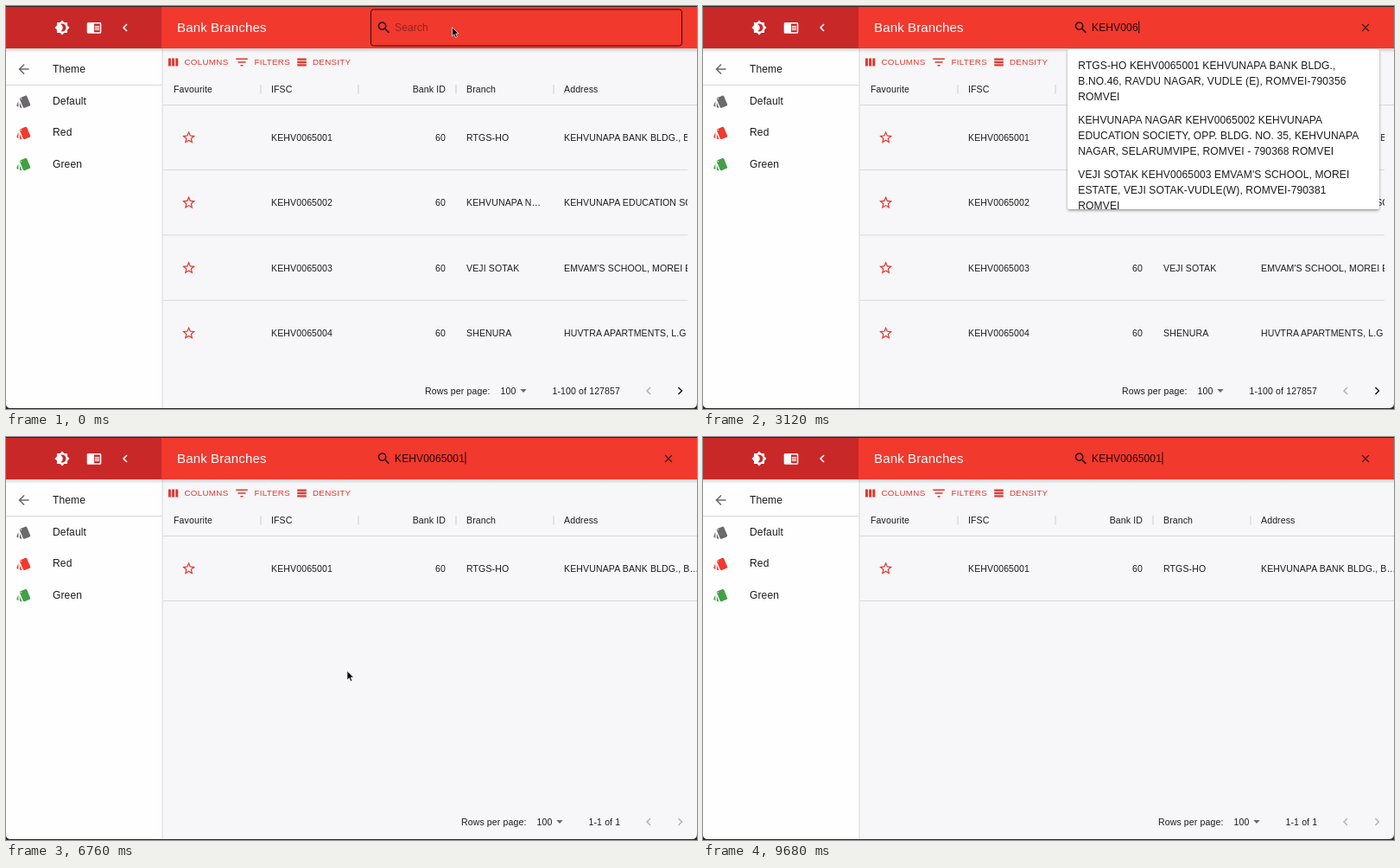
An HTML page for the animation above (9720 ms loop, 800 px wide and 466 px high).

```html
<!DOCTYPE html>
<html lang="en">
<head>
<meta charset="utf-8">
<title>Bank Branches</title>
<style>
  html, body { margin: 0; width: 100%; height: 100%; overflow: hidden; background: #2b2525; }
  svg { display: block; }
  text { font: 10.56px "Liberation Sans", Arial, sans-serif; letter-spacing: .0107em; fill: #1c1b1c; white-space: pre; }
  .body { font-size: 12.06px; letter-spacing: .0094em; }
  .title { font-size: 15.07px; letter-spacing: .0075em; fill: #fff; }
  .button { font-size: 9.8px; letter-spacing: .0286em; fill: #e0382e; }
  .line { stroke: #d9d7da; }
  .spin { fill: none; stroke-width: 3.6; }
  .hidden { display: none; }
</style>
</head>
<body>
<svg id="stage" width="800" height="466" viewBox="0 0 800 466">
  <defs>
    <clipPath id="window"><path d="M0 1H800V459Q800 465 794 465H6Q0 465 0 459Z"/></clipPath>
    <clipPath id="grid"><rect x="182" y="50" width="607" height="380"/></clipPath>
    <clipPath id="menuClip"><rect x="422" y="50" width="361" height="185"/></clipPath>
    <linearGradient id="barShade" x2="0" y2="1">
      <stop stop-color="#000" stop-opacity=".16"/><stop offset="1" stop-color="#000" stop-opacity="0"/>
    </linearGradient>
    <filter id="lift" x="-5%" y="-10%" width="110%" height="130%">
      <feDropShadow dx="0" dy="1.5" stdDeviation="1.6" flood-opacity=".4"/>
    </filter>
  </defs>
  <g clip-path="url(#window)">
    <rect width="800" height="466" fill="#f7f6f8"/>
    <rect width="181" height="466" fill="#fefefe"/>
    <path class="line" d="M181 49V466M0 91.5H181M182 114.5H800" fill="none"/>
    <rect y="49" width="800" height="5" fill="url(#barShade)"/>
    <rect width="800" height="49" fill="#f1392e"/>
    <rect width="180" height="49" fill="#c92828"/>
    <g id="chrome"></g>
    <rect id="hover" x="182" y="115" width="618" height="74" fill="#ebeaec"/>
    <g id="all"><g id="allRows" clip-path="url(#grid)"></g></g>
    <g id="found"></g>
    <path id="gridSpin" class="spin" stroke="#f1392e" d="M20.2 0A20.2 20.2 0 1 1 -20.2 0A20.2 20.2 0 1 1 20.2 0"/>
    <rect id="outline" x="422.5" y="4" width="360" height="42" rx="3" fill="none" stroke="#3a0d0a"/>
    <g id="field"></g>
    <text id="query" class="body" x="450" y="29"></text>
    <rect id="caret" y="17.5" width="1" height="14" fill="#1c0a08"/>
    <g id="clear"></g>
    <path id="fieldSpin" class="spin" stroke="#3a0d0a" d="M20.2 0A20.2 20.2 0 1 1 -20.2 0A20.2 20.2 0 1 1 20.2 0"/>
    <g id="options"></g>
    <g id="loading"></g>
    <path id="arrow" d="M0 0V10.4L2.4 8.2L4 12L5.8 11.2L4.2 7.5H7.5Z" fill="#000" stroke="#fff" stroke-width=".7"/>
    <path id="beam" d="M-2-7.5Q0-7.5 0-6Q0-7.5 2-7.5M0-6V6M-2 7.5Q0 7.5 0 6Q0 7.5 2 7.5" fill="none" stroke="#111"/>
  </g>
</svg>
<script>
const $ = id => document.getElementById(id);
const add = (id, ...parts) => $(id).insertAdjacentHTML('beforeend', parts.join(''));
const show = (id, on) => $(id).classList.toggle('hidden', !on);

const text = (x, y, s, cls = '', more = '') => `<text x="${x}" y="${y}" class="${cls}" ${more}>${s}</text>`;
const RED = '#e0382e', GREY = '#6b696b', PALE = '#b5b3b6', INK = '#1c1b1c';
const paths = {
  bright: 'M20 8.69V4h-4.69L12 .69 8.69 4H4v4.69L.69 12 4 15.31V20h4.69L12 23.31 15.31 20H20v-4.69L23.31 12 20 8.69zM12 18c-.89 0-1.74-.2-2.5-.55C11.56 16.5 13 14.42 13 12s-1.44-4.5-3.5-5.45C10.26 6.2 11.11 6 12 6c3.31 0 6 2.69 6 6s-2.69 6-6 6z',
  reader: 'M13 12h7v1.5h-7zm0-2.5h7V11h-7zm0 5h7V16h-7zM21 4H3c-1.1 0-2 .9-2 2v13c0 1.1.9 2 2 2h18c1.1 0 2-.9 2-2V6c0-1.1-.9-2-2-2zm0 15h-9V6h9v13z',
  left: 'M15.41 7.41L14 6l-6 6 6 6 1.41-1.41L10.83 12z',
  right: 'M10 6L8.59 7.41 13.17 12l-4.58 4.59L10 18l6-6z',
  back: 'M20 11H7.83l5.59-5.59L12 4l-8 8 8 8 1.41-1.41L7.83 13H20v-2z',
  style: 'M2.53 19.65l1.34.56v-9.03l-2.43 5.86c-.41 1.02.08 2.19 1.09 2.61zm19.5-3.7L17.07 3.98c-.31-.75-1.04-1.21-1.81-1.23-.26 0-.53.04-.79.15L7.1 5.95c-.75.31-1.21 1.03-1.23 1.8-.01.27.04.54.15.8l4.96 11.97c.31.76 1.05 1.22 1.83 1.23.26 0 .52-.05.77-.15l7.36-3.05c1.02-.42 1.51-1.59 1.09-2.6zM7.88 8.75c-.55 0-1-.45-1-1s.45-1 1-1 1 .45 1 1-.45 1-1 1zm-2 11c0 1.1.9 2 2 2h1.45l-3.45-8.34v6.34z',
  columns: 'M4.5 6h4v12h-4zm5.5 0h4v12h-4zm5.5 0h4v12h-4z',
  filter: 'M10 18h4v-2h-4v2zM3 6v2h18V6H3zm3 7h12v-2H6v2z',
  density: 'M5 6h14v3H5zm0 4.5h14v3H5zm0 4.5h14v3H5z',
  star: 'M22 9.24l-7.19-.62L12 2 9.19 8.63 2 9.24l5.46 4.73L5.82 21 12 17.27 18.18 21l-1.63-7.03L22 9.24zM12 15.4l-3.76 2.27 1-4.28-3.32-2.88 4.38-.38L12 6.1l1.71 4.04 4.38.38-3.32 2.88 1 4.28L12 15.4z',
  search: 'M15.5 14h-.79l-.28-.27C15.41 12.59 16 11.11 16 9.5 16 5.91 13.09 3 9.5 3S3 5.91 3 9.5 5.91 16 9.5 16c1.61 0 3.09-.59 4.23-1.57l.27.28v.79l5 4.99L20.49 19l-4.99-5zm-6 0C7.01 14 5 11.99 5 9.5S7.01 5 9.5 5 14 7.01 14 9.5 11.99 14 9.5 14z',
  close: 'M19 6.41L17.59 5 12 10.59 6.41 5 5 6.41 10.59 12 5 17.59 6.41 19 12 13.41 17.59 19 19 17.59 13.41 12z',
  down: 'M7 9.5l5 5 5-5z'
};
const icon = (name, x, y, color, scale = .754) =>
  `<path d="${paths[name]}" fill="${color}" fill-rule="evenodd" transform="translate(${x} ${y}) scale(${scale}) translate(-12 -12)"/>`;

add('chrome',
  icon('bright', 65, 25, '#fff'), icon('reader', 102, 25, '#fff'), icon('left', 138, 25, '#fff'),
  text(198, 29.5, 'Bank Branches', 'title'),
  icon('back', 20.5, 73, GREY), text(54, 77, 'Theme', 'body'),
  ...[['Default', GREY], ['Red', '#f1392e'], ['Green', '#43a047']].map(([name, color], i) =>
    icon('style', 20.5, 110.5 + i * 36.2, color) + text(54, 114.2 + i * 36.2, name, 'body')),
  icon('columns', 193.6, 65, RED), text(206.5, 68, 'COLUMNS', 'button'),
  icon('filter', 273, 65, RED), text(287.5, 68, 'FILTERS', 'button'),
  icon('density', 342.5, 65, RED), text(355, 68, 'DENSITY', 'button'),
  text(194, 100, 'Favourite'), text(307, 100, 'IFSC'), text(509, 100, 'Bank ID', '', 'text-anchor="end"'),
  text(533, 100, 'Branch'), text(646, 100, 'Address'),
  ...[295, 408, 521, 634].map(x => `<path d="M${x} 91V101.5" stroke="#cfcdd0"/>`));

const row = (i, branch, address) => {
  const y = 152 + i * 75.4;
  return icon('star', 211.6, y, RED) + text(307, y + 3.8, 'KEHV006500' + (i + 1)) +
    text(509, y + 3.8, 60, '', 'text-anchor="end"') + text(533, y + 3.8, branch) + text(646, y + 3.8, address) +
    (i < 3 ? `<path class="line" d="M182 ${y + 37.5}H800"/>` : '');
};
const footer = (x, range, nextColor) =>
  text(x, 448.8, 'Rows per page:') + text(x + 87.5, 448.8, 100) + icon('down', x + 114, 445, GREY) +
  text(x + 147.5, 448.8, range) + icon('left', 744, 445, PALE) + icon('right', 780.5, 445, nextColor);

add('allRows',
  row(0, 'RTGS-HO', 'KEHVUNAPA BANK BLDG., B.NO.46'),
  row(1, 'KEHVUNAPA N…', 'KEHVUNAPA EDUCATION SOCIETY'),
  row(2, 'VEJI SOTAK', "EMVAM'S SCHOOL, MOREI ESTATE"),
  row(3, 'SHENURA', 'HUVTRA APARTMENTS, L.G'));
add('all', footer(485, '1-100 of 127857', INK));
add('found', row(0, 'RTGS-HO', 'KEHVUNAPA BANK BLDG., B…'), footer(527, '1-1 of 1', PALE));

const paper = height => `<rect x="422" y="50" width="361" height="${height}" rx="3" fill="#fff" filter="url(#lift)"/>`;
const choices = [
  ['RTGS-HO KEHV0065001 KEHVUNAPA BANK BLDG.,', 'B.NO.46, RAVDU NAGAR, VUDLE (E), ROMVEI-790356', 'ROMVEI'],
  ['KEHVUNAPA NAGAR KEHV0065002 KEHVUNAPA', 'EDUCATION SOCIETY, OPP. BLDG. NO. 35, KEHVUNAPA', 'NAGAR, SELARUMVIPE, ROMVEI - 790368 ROMVEI'],
  ["VEJI SOTAK KEHV0065003 EMVAM'S SCHOOL, MOREI", 'ESTATE, VEJI SOTAK-VUDLE(W), ROMVEI-790381', 'ROMVEI']
];
add('options', paper(185), '<g clip-path="url(#menuClip)">',
  ...choices.flatMap((lines, i) => lines.map((s, j) => text(434.3, 72.6 + i * 63.3 + j * 18.1, s, 'body'))), '</g>');
add('loading', paper(38), text(434.3, 73, 'Loading…', 'body', 'style="fill:#757375"'));
add('field', icon('search', 437.5, 25, '#2a0806'));
add('clear', icon('close', 767, 25, '#4a120e', .628));

const LOOP = 9720, CODE = 'KEHV0065001';
const OPEN = 80, LOAD = 3870, CLOSE = 5560, FETCH = 5705, RESULT = 6120;
const keys = [360, 800, 1300, 1900, 2250, 2600, 2950, 3300, 3650, 4000, 4700];
const track = [[6360, 500, 60], [6760, 395, 270.5], [7280, 335, 335], [7600, 318, 338],
               [8320, 243.5, 178], [8600, 243.5, 176], [9080, 480, 18], [9240, 484, 18]];

const mix = (a, b, p) => a + (b - a) * p;
const smooth = p => p * p * (3 - 2 * p);

function pointer(t) {
  if (t < 320) return [516.5, 24.5];
  const i = track.findIndex(([time]) => time > t);
  if (i < 1) return null;
  const [t0, x0, y0] = track[i - 1], [t1, x1, y1] = track[i];
  const p = smooth((t - t0) / (t1 - t0));
  return [mix(x0, x1, p), mix(y0, y1, p)];
}

// Indeterminate ring: the arc grows, then its tail catches up, while the whole ring turns.
function spin(id, age, x, y, size) {
  const cycle = age % 1400 / 1400, growing = cycle < .5;
  const p = smooth(cycle * 2 % 1);
  const ring = $(id);
  ring.setAttribute('stroke-dasharray', `${growing ? mix(1, 100, p) : 100} 200`);
  ring.setAttribute('stroke-dashoffset', growing ? -15 * p : mix(-15, -125, p));
  ring.setAttribute('transform', `translate(${x} ${y}) scale(${size / 44}) rotate(${cycle * 360 - 90})`);
}

function draw(t) {
  const typed = keys.filter(k => k <= t).length;
  const open = t >= OPEN && t < CLOSE, done = t >= RESULT;
  const query = $('query');
  query.textContent = typed ? CODE.slice(0, typed) : 'Search';
  query.style.fill = typed ? '#260705' : '#94251f';
  show('outline', t < OPEN);
  show('clear', typed);
  show('options', open && t < LOAD);
  show('loading', open && t >= LOAD);

  const blinkFrom = t >= 5280 ? 5280 : typed ? keys[typed - 1] : OPEN;
  show('caret', t >= OPEN && (t - blinkFrom) % 1000 < 500);
  $('caret').setAttribute('x', typed ? 450.5 + query.getComputedTextLength() : 450);

  show('fieldSpin', open && t >= LOAD);
  spin('fieldSpin', t - LOAD + 1400, 745.5, 25, 15.07);
  show('gridSpin', t >= FETCH && !done);
  spin('gridSpin', t - FETCH + 7000, 504, 285.7, 30.15);
  show('all', !done);
  show('found', done);

  const at = pointer(t), inField = at && t > 320 && at[0] > 422 && at[1] < 46;
  show('arrow', at && !inField);
  show('beam', inField);
  show('hover', done && at && at[1] > 114 && at[1] < 190);
  if (at) for (const id of ['arrow', 'beam']) $(id).setAttribute('transform', `translate(${at})`);
}

function tick() {
  draw(performance.now() % LOOP);
  requestAnimationFrame(tick);
}
tick();
</script>
</body>
</html>
```
